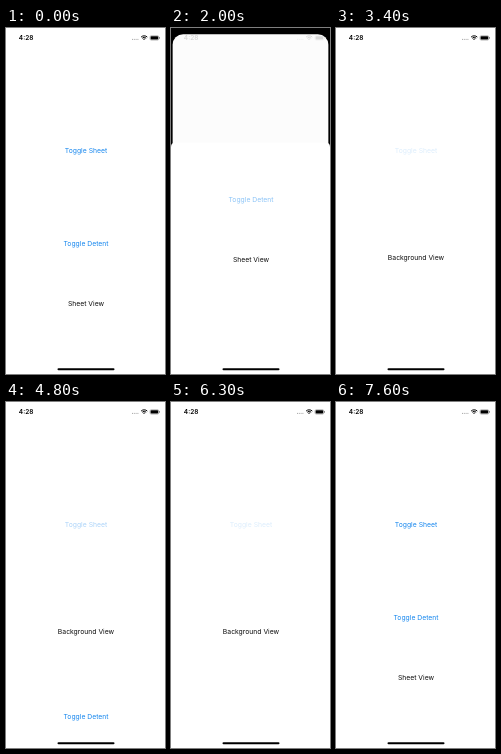
These frames come from a looping animation (159 by 346 pixels, 8 s). An HTML page with a canvas:

```html
<!DOCTYPE html>
<html lang="en">
<head>
<meta charset="utf-8">
<title>Sheet detents</title>
<style>
  html, body { margin: 0; width: 159px; height: 346px; overflow: hidden; background: #fff; }
  canvas { display: block; width: 159px; height: 346px; }
</style>
</head>
<body>
<canvas></canvas>
<script>
const W = 159, H = 346, LOOP = 8000, STEP = 50;
const MEDIUM_TOP = 159, LARGE_TOP = 23;
const BLUE = '#1586ee';
const canvas = document.querySelector('canvas');
const ctx = canvas.getContext('2d');
const dpr = window.devicePixelRatio || 1;
canvas.width = W * dpr;
canvas.height = H * dpr;

const lerp = (a, b, k) => a + (b - a) * k;
const ramp = (t, start, length) => Math.min(1, Math.max(0, (t - start) / length));

// Critically damped spring from 0 to 1
function spring(t, start) {
  const x = Math.max(0, t - start) * 0.0192;
  return 1 - (1 + x) * Math.exp(-x);
}

function label(text, y, color = '#0c0c0c', alpha = 1) {
  ctx.globalAlpha = alpha;
  ctx.fillStyle = color;
  ctx.font = '6.8px Inter, sans-serif';
  ctx.textAlign = 'center';
  ctx.fillText(text, 80, y + 2.5);
  ctx.globalAlpha = 1;
}

function box(x, y, w, h, r, color) {
  ctx.fillStyle = color;
  ctx.beginPath();
  ctx.roundRect(x, y, w, h, r);
  ctx.fill();
}

function statusBar(level) {
  const color = `rgb(${level}, ${level}, ${level})`;
  ctx.fillStyle = ctx.strokeStyle = color;
  ctx.font = '600 6.5px Inter, sans-serif';
  ctx.textAlign = 'left';
  ctx.fillText('4:28', 12.8, 12.2);

  ctx.globalAlpha = 0.35;
  for (let i = 0; i < 4; i++) ctx.fillRect(126 + i * 1.8, 10.9, 1, 1);
  ctx.globalAlpha = 1;

  ctx.lineWidth = 1;
  for (const r of [1.2, 2.8, 4.4]) {
    ctx.beginPath();
    ctx.arc(138.2, 12.2, r, -Math.PI * 0.75, -Math.PI * 0.25);
    ctx.stroke();
  }

  ctx.lineWidth = 0.5;
  ctx.globalAlpha = 0.5;
  ctx.beginPath();
  ctx.roundRect(144, 7.7, 8.8, 4.4, 1.3);
  ctx.stroke();
  ctx.globalAlpha = 1;
  box(144.6, 8.3, 7.6, 3.2, 0.8, color);
  ctx.fillRect(153.3, 9.2, 0.5, 1.4);
}

function draw(t) {
  const large = Math.max(0, spring(t, 735) - spring(t, 1879));
  const shown = 1 - spring(t, 3190) + spring(t, 4717) - spring(t, 5764) + spring(t, 7017);
  const top = lerp(MEDIUM_TOP, LARGE_TOP, large) + 187 * (1 - shown);
  const sheetFade = ramp(t, 3190, 200) - ramp(t, 4750, 200) + ramp(t, 5764, 200) - ramp(t, 7050, 200);
  const detentFade = ramp(t, 735, 200) - ramp(t, 1900, 250);
  // Content stretches on the way up but snaps to the compact layout on the way down
  const stretch = t < 1879 ? large : 0;

  ctx.setTransform(dpr, 0, 0, dpr, 0, 0);
  ctx.fillStyle = '#000';
  ctx.fillRect(0, 0, W, H);

  // Background view, pushed back while the sheet is large
  const inset = 6.3 * large ** 1.2;
  const scale = 1 - 2 * inset / W;
  const corner = lerp(14, 4, large) * Math.min(1, large * 10);
  ctx.save();
  ctx.translate(inset, 19 * large);
  ctx.scale(scale, scale);
  box(0, 0, W, H * 1.1, corner, '#fff');
  label('Toggle Sheet', 122, BLUE, 1 - 0.85 * sheetFade);
  label('Background View', 229);
  box(0, 0, W, H * 1.1, corner, `rgba(0, 0, 0, ${0.1 * large ** 2})`);
  ctx.restore();

  statusBar(Math.round(255 * Math.min(1, large * 2.6)));

  // Sheet
  box(0, top, W, H, [4, 4, 0, 0], '#fff');
  label('Toggle Detent', top + lerp(56.5, 101, stretch), BLUE, 1 - 0.85 * detentFade);
  label('Sheet View', top + lerp(116.5, 207, stretch));

  box(51.5, 340.3, 57, 2, 1, '#000');
}

function tick() {
  const t = performance.now() % LOOP;
  draw(Math.floor(t / STEP) * STEP);
  requestAnimationFrame(tick);
}
tick();
</script>
</body>
</html>
```
